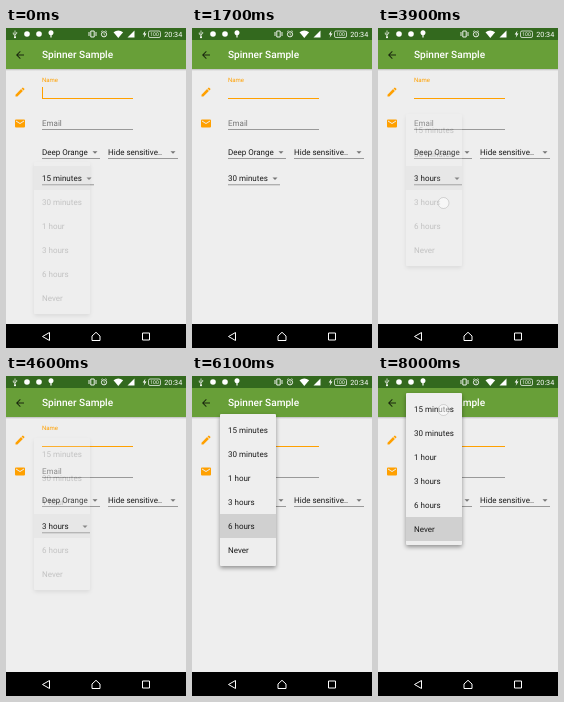
Animation, 180 px wide and 320 px high, one loop 8.1 s. Source, as an HTML page:

```html
<!DOCTYPE html>
<html lang="en">
<head>
<meta charset="utf-8">
<title>Spinner Sample</title>
<style>
  html, body { margin: 0; width: 100%; height: 100%; overflow: hidden; background: #eee; }
  svg { display: block; width: 100vw; height: 100vh; }
  text { font: 8px Roboto, "Noto Sans", sans-serif; fill: #1a1a1a; text-rendering: geometricPrecision; }
  .accent { fill: #ffa000; }
  .line { fill: #757575; }
  .pressed .line { fill: #ffa000; }
  .outline { fill: none; stroke: #fff; }
  .popup { filter: drop-shadow(0 2px 2px rgba(0, 0, 0, .4)); }
</style>
</head>
<body>
<svg viewBox="0 0 180 320" preserveAspectRatio="none">
  <defs>
    <linearGradient id="shade" x2="0" y2="1">
      <stop stop-color="#000" stop-opacity=".2"/>
      <stop offset="1" stop-color="#000" stop-opacity="0"/>
    </linearGradient>
    <path id="arrow" class="line" d="M-2.5 -1h5l-2.5 2.500z"/>
  </defs>

  <rect width="180" height="320" fill="#eee"/>
  <rect y="12" width="180" height="29" fill="#689f38"/>
  <rect y="41" width="180" height="2" fill="url(#shade)"/>
  <rect width="180" height="12" fill="#33691e"/>

  <!-- status bar -->
  <g fill="#fff">
    <path d="M9 2.500v7M7.300 4.500v1.700l1.700 1.200M10.700 4v1.500l-1.700 1.200" class="outline" stroke-width=".7"/>
    <circle cx="9" cy="9.300" r="1"/>
    <circle cx="21" cy="6" r="2.800"/>
    <circle cx="33" cy="6" r="2.800"/>
    <path d="M44.400 9.500v-2.300a2.500 2.500 0 1 1 1.200 0v2.300z"/>
    <path d="M84.800 3h3.400v6h-3.400zM83 4v4M90 4v4" class="outline" stroke-width=".9"/>
    <circle cx="98" cy="6.300" r="2.600" class="outline" stroke-width=".9"/>
    <path d="M98 4.800v1.700l1.200.7M95 3.800l1.500-1.300M101 3.800l-1.500-1.300" class="outline" stroke-width=".6"/>
    <path d="M107.500 4.300q4.800-3.600 9.600 0l-4.800 5.700z"/>
    <path d="M128.500 2.500v7h-7z"/>
    <path d="M139.500 2.500l-2.800 4h1.800l-.8 3.300 2.800-4.300h-1.800z"/>
    <rect x="142.500" y="3" width="12" height="6.500" rx="1.500" class="outline" stroke-width=".7"/>
    <text x="148.500" y="8.100" text-anchor="middle" style="font-size:5px;fill:#fff">100</text>
    <text x="158.300" y="8.800" style="font-size:7.200px;fill:#fff">20:34</text>
  </g>

  <!-- toolbar -->
  <path d="M18 26.500h-6.100l2.800-2.800L14 23l-4 4 4 4 .7-.7-2.800-2.800H18z" fill="#000" fill-opacity=".75"/>
  <text x="36" y="30.300" style="font-size:10.100px;font-weight:500;fill:#fff">Spinner Sample</text>

  <!-- form -->
  <g class="accent">
    <path transform="translate(8 58) scale(.5)" d="M3 17.250V21h3.750L17.800 9.900l-3.700-3.700zM20.700 7q.7-.7 0-1.400l-2.300-2.300q-.7-.7-1.400 0l-1.900 1.800 3.800 3.800z"/>
    <path transform="translate(8 89.500) scale(.5)" d="M20 4H4a2 2 0 0 0-2 2v12a2 2 0 0 0 2 2h16a2 2 0 0 0 2-2V6a2 2 0 0 0-2-2zm0 4l-8 5-8-5V6l8 5 8-5z"/>
    <rect x="36" y="70" width="91" height="1"/>
    <rect id="cursor" x="36" y="59" width="1" height="11"/>
  </g>
  <text x="36" y="53.800" style="font-size:6px;fill:#ffa000">Name</text>
  <text x="36" y="97.800" style="fill:#757575">Email</text>
  <rect x="36" y="101.300" width="91" height=".7" class="line"/>

  <text x="36" y="126.500">Deep Orange</text>
  <rect x="36" y="130" width="58" height=".7" class="line"/>
  <use href="#arrow" x="89" y="124.300"/>
  <text x="102" y="126.500">Hide sensitive..</text>
  <rect x="102" y="130" width="70" height=".7" class="line"/>
  <use href="#arrow" x="167" y="124.300"/>

  <g id="spinner">
    <text id="value" x="36" y="153"></text>
    <rect id="rule" x="36" y="156.500" class="line"/>
    <use id="caret" href="#arrow" y="150.500"/>
  </g>

  <g id="popup" class="popup">
    <rect x="28" width="56" height="152" rx="1" fill="#eee"/>
    <rect id="chosen" x="28" width="56" height="24" fill="#d0d0d0"/>
    <g id="items"></g>
  </g>
  <circle id="touch" r="5.500" fill="#fff" fill-opacity=".5" stroke="#888" stroke-opacity=".45" stroke-width=".7"/>

  <!-- navigation bar -->
  <rect y="296" width="180" height="24"/>
  <g class="outline" stroke-width="1" stroke-linejoin="round">
    <path d="M43.500 304.500v8l-7-4z"/>
    <path d="M86 312.500v-4.500l4-3.700 4 3.700v4.500z"/>
    <rect x="136.500" y="305" width="7" height="7"/>
  </g>
</svg>
<script>
  const LOOP = 8100, STEP = 100, ROW = 24, PAD = 4, TOUCH_STEPS = 3;
  const options = ["15 minutes", "30 minutes", "1 hour", "3 hours", "6 hours", "Never"];

  // One round per selected option, in steps of 100 ms.
  const rounds = [
    { tap: -4, release: -1, open: 0, pick: 7, close: 10 },
    { tap: 14, release: 17, open: 18, pick: 23, close: 25 },
    { tap: 30, release: 32, open: 32, pick: 37, close: 39 },
    { tap: 43, release: 46, open: 46, pick: 50, close: 53 },
    { tap: 56, release: 59, open: 60, pick: 63, close: 66 },
    { tap: 69, release: 73, open: 73, pick: 79, close: 99 }
  ];

  const $ = id => document.getElementById(id);
  const set = (id, attrs) => {
    for (const key in attrs) $(id).setAttribute(key, attrs[key]);
  };

  options.forEach((label, i) => {
    const item = document.createElementNS("http://www.w3.org/2000/svg", "text");
    item.setAttribute("x", 36);
    item.setAttribute("y", PAD + ROW * i + 15);
    item.textContent = label;
    $("items").append(item);
  });

  function popupAlpha(round, tick) {
    if (tick < round.open || tick > round.close) return 0;
    return tick === round.open || tick === round.close ? 0.2 : 1;
  }

  function draw(time) {
    const tick = Math.floor(time / STEP);
    const index = rounds.findLastIndex(r => r.tap <= tick);
    const round = rounds[index];
    const next = (index + 1) % options.length;
    const shown = tick >= round.close ? next : index;
    const width = shown < 2 ? 52 : 48;

    $("value").textContent = options[shown];
    const pressed = tick > round.tap && tick < round.release;
    set("spinner", { class: pressed ? "pressed" : "" });
    set("rule", { width, height: pressed ? 1 : 0.7 });
    set("caret", { x: 31 + width });
    set("cursor", { opacity: tick < 1 ? 1 : 0 });

    // The selected row covers the spinner unless the status bar is in the way.
    const top = Math.max(17, 134 - ROW * index);
    set("popup", { transform: `translate(0 ${top})`, opacity: popupAlpha(round, tick) });
    set("chosen", { y: PAD + ROW * index });

    const picking = tick >= round.pick;
    const since = tick - (picking ? round.pick : round.tap);
    set("touch", {
      cx: picking ? 65.5 : 71,
      cy: picking ? top + PAD + ROW * (next + 0.5) + 1 : 150,
      opacity: since < TOUCH_STEPS && (picking || tick < round.open) ? 1 : 0
    });
  }

  function frame() {
    draw(performance.now() % LOOP);
    requestAnimationFrame(frame);
  }
  frame();
</script>
</body>
</html>
```
